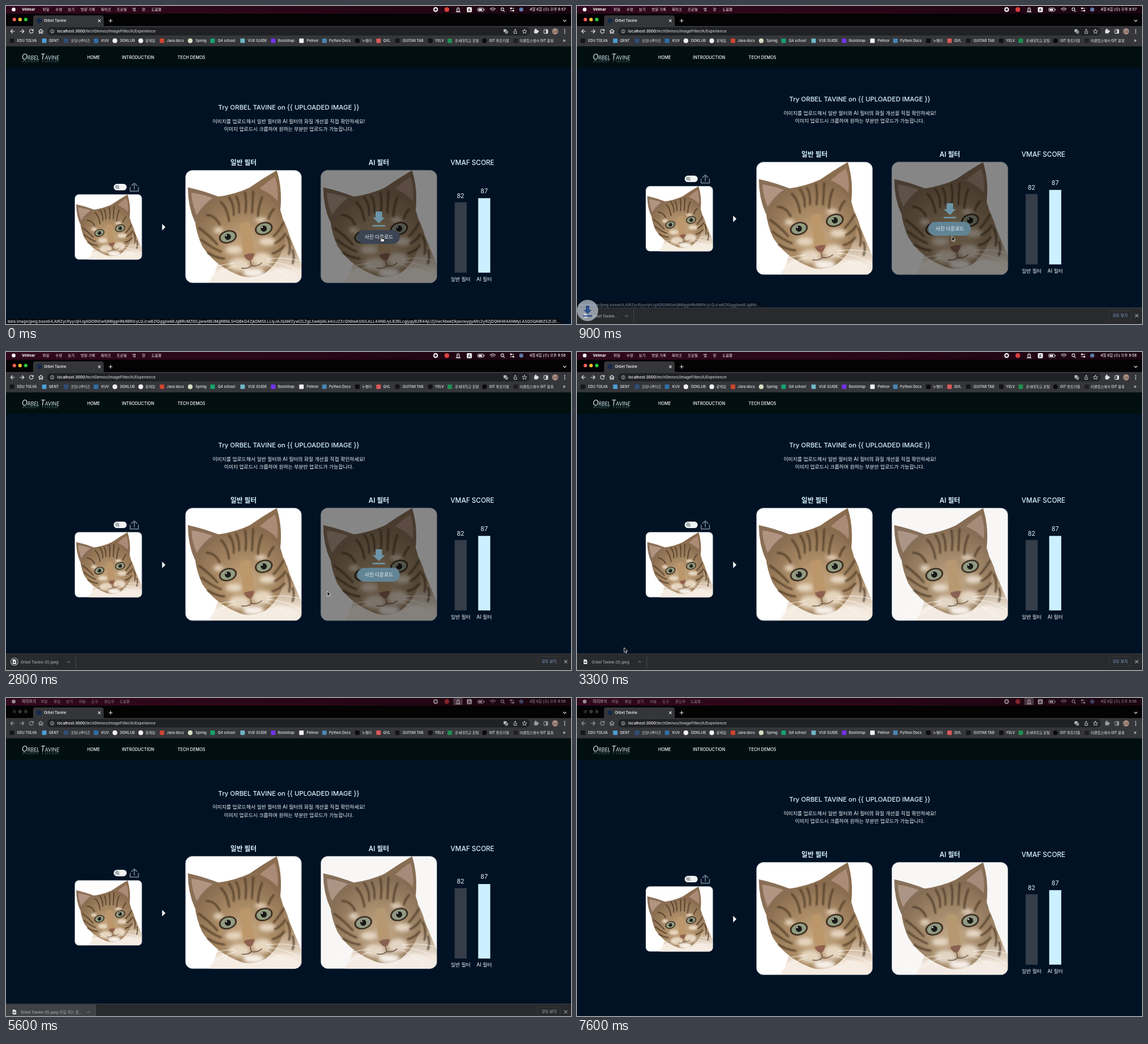
An HTML page that plays this animation: 960 by 540 pixels, repeating every 8 s.

```html
<!DOCTYPE html>
<html lang="ko">
<head>
<meta charset="utf-8">
<title>Orbel Tavine</title>
<style>
  html, body { margin: 0; width: 100%; height: 100%; overflow: hidden; background: #011224; }
  svg { display: block; width: 960px; height: 540px; }
  text { font-family: Inter, 'Noto Sans CJK KR', 'Noto Sans CJK', sans-serif; font-weight: 500; white-space: pre; }
  .mid { text-anchor: middle; }
  .end { text-anchor: end; }
  .bold { font-weight: 700; }
  .semi { font-weight: 600; }
  .thin { font-weight: 400; }
  .logo { font: italic 400 12.9px Lato, sans-serif; font-variant: small-caps; }
  .line { fill: none; stroke: #dfe1e5; stroke-width: 1.1; stroke-linecap: round; stroke-linejoin: round; }
</style>
</head>
<body>
<svg id="stage" viewBox="0 0 960 540"></svg>
<script>
const LOOP = 8000;
const NAME = 'Orbel Tavine';
const FILE = NAME + ' (5).jpeg';
const PHOTO_W = 197, PHOTO_H = 191;

// y is the middle of the line
const text = (x, y, s, size, fill = '#fff', cls = '', id = '') =>
  `<text id="${id}" class="${cls}" x="${x}" y="${y + size * 0.36}" font-size="${size}" fill="${fill}">${s}</text>`;
const rect = (x, y, w, h, fill, r = 0, more = '') =>
  `<rect x="${x}" y="${y}" width="${w}" height="${h}" rx="${r}" fill="${fill}" ${more}/>`;
const dot = (x, y, r, fill, more = '') => `<circle cx="${x}" cy="${y}" r="${r}" fill="${fill}" ${more}/>`;
const path = (d, fill, more = '') => `<path d="${d}" fill="${fill}" ${more}/>`;
const line = (d, more = '') => `<path class="line" d="${d}" ${more}/>`;

const defs = `<defs>
  <radialGradient id="fur" cx=".56" cy=".66" r=".62">
    <stop offset="0" stop-color="#c9ab84"/><stop offset=".5" stop-color="#a98a65"/><stop offset="1" stop-color="#8a6d50"/>
  </radialGradient>
  <linearGradient id="body" x1="0" y1="0" x2="0" y2="1">
    <stop offset="0" stop-color="#8a6d4c"/><stop offset=".5" stop-color="#b0926e"/><stop offset=".85" stop-color="#f3e8db"/>
  </linearGradient>
  <linearGradient id="fade" gradientUnits="userSpaceOnUse" x1="0" y1="91" x2="0" y2="85">
    <stop offset="0" stop-color="#a9d6ea" stop-opacity=".7"/><stop offset="1" stop-color="#a9d6ea" stop-opacity="0"/>
  </linearGradient>
  <linearGradient id="menuBg"><stop offset="0" stop-color="#31081d"/><stop offset=".5" stop-color="#2a0718"/><stop offset="1" stop-color="#1a0410"/></linearGradient>
  <filter id="soft"><feGaussianBlur stdDeviation=".9"/></filter>
  <filter id="softer"><feGaussianBlur stdDeviation="3"/></filter>
  <clipPath id="frame"><rect width="${PHOTO_W}" height="${PHOTO_H}" rx="12"/></clipPath>
  <clipPath id="view"><rect y="69" width="960" height="471"/></clipPath>
  <g id="cat">${cat()}</g>
</defs>`;

function cat() {
  const eye = (x, y) => `<g transform="translate(${x} ${y}) rotate(-16)">
    <ellipse rx="15.5" ry="11" fill="#3f3024"/><ellipse rx="12.5" ry="8.6" fill="#929c80"/>
    ${dot(0, 0, 5.2, '#1b1a18')}${dot(-2, -3, 1.2, '#e9eee8')}</g>`;
  const stripes = 'M60 54Q71 64 74 86M74 46Q83 58 82 76M86 44Q92 54 91 72M101 38Q104 50 102 72' +
    'M115 36Q114 54 113 72M130 46Q124 60 123 78M36 76Q50 76 58 92M150 66Q144 72 141 82' +
    'M23 98Q40 110 54 126M27 118Q45 132 60 138M38 140Q52 149 66 150' +
    'M166 90Q158 104 150 112M170 108Q162 119 152 124M168 128Q160 138 148 141M173 112Q180 126 176 142M182 136Q186 146 182 158';
  return path('M152 60Q171 88 177 112Q188 138 198 162V192H46Q48 176 56 156Z', 'url(#body)') +
    path('M40 192Q48 172 66 164Q105 190 160 166Q190 168 198 192Z', '#f5ece2', 'filter="url(#soft)"') +
    path('M16 84Q30 58 54 45Q84 41 110 29Q140 42 160 64Q170 92 169 120Q162 154 136 174Q110 188 86 176Q48 160 28 128Q18 106 16 84Z', 'url(#fur)') +
    path('M57 45Q28 34 4 29Q4 62 16 88Q30 62 57 45Z', '#8a6f57') +
    path('M46 47Q26 40 10 38Q11 58 19 76Q30 58 46 47Z', '#b19482') +
    path('M108 30Q131 14 155 0Q165 32 161 68Q145 45 108 30Z', '#8a6c4f') +
    path('M126 31Q141 18 152 11Q159 32 156 52Q145 39 126 31Z', '#ab8a76') +
    `<g filter="url(#softer)" fill="#e6d6c0">
      <ellipse cx="82" cy="135" rx="14" ry="7"/><ellipse cx="139" cy="121" rx="14" ry="7"/>
      <ellipse cx="56" cy="102" rx="8" ry="5"/><ellipse cx="128" cy="84" rx="10" ry="4"/>
      <ellipse cx="91" cy="160" rx="18" ry="11"/><ellipse cx="131" cy="152" rx="17" ry="12"/>
      <ellipse cx="116" cy="174" rx="18" ry="8" fill="#f7f0e8"/>
    </g>
    <g filter="url(#soft)">
      <path d="${stripes}" fill="none" stroke="#4a3625" stroke-width="3.4" stroke-linecap="round" opacity=".75"/>
      ${path('M92 92Q101 86 110 89Q113 118 119 144L99 148Q95 120 92 92Z', '#bb976b')}
    </g>` + eye(72, 113) + eye(133, 99) +
    path('M99 144Q108 140 117 141Q116 150 110 154Q102 152 99 144Z', '#8f604f') +
    path('M110 154L112 162M95 166Q106 168 112 162Q122 164 130 157', 'none', 'stroke="#5a4135" stroke-width="1.5" opacity=".8"') +
    path('M84 158Q50 160 22 174M86 162Q58 170 34 188M138 151Q168 146 194 154M138 155Q168 156 195 172M136 159Q160 168 178 186', 'none', 'stroke="#fff" stroke-width=".9" opacity=".85"');
}

const photo = (x, y, s, bg, more = '') => `<g transform="translate(${x} ${y}) scale(${s})">
  <g clip-path="url(#frame)">${rect(0, 0, PHOTO_W, PHOTO_H, bg)}<use href="#cat" ${more}/></g>
  ${rect(0, 0, PHOTO_W, PHOTO_H, 'none', 12, `stroke="#a9b7c2" stroke-width="${1 / s}" stroke-dasharray="${1.2 / s}"`)}</g>`;

function page() {
  const pale = '#d8f3ff';
  return `<g clip-path="url(#view)"><g id="page">` +
    text(480.5, 172, `Try ${NAME.toUpperCase()} on {{ UPLOADED IMAGE }}`, 11, pale, 'mid') +
    text(480.5, 195.5, '이미지를 업로드해서 일반 필터와 AI 필터의 화질 개선을 직접 확인하세요!', 8.5, '#f0f7fb', 'mid thin') +
    text(480.5, 209, '이미지 업로드시 크롭하여 원하는 부분만 업로드가 가능합니다.', 8.5, '#f0f7fb', 'mid thin') +
    text(403.5, 266, '일반 필터', 11.3, pale, 'mid semi') +
    text(633.5, 266, 'AI 필터', 11.3, pale, 'mid semi') +
    text(792.5, 266, 'VMAF SCORE', 11.3, pale, 'mid') +
    photo(117, 320, 0.578, '#fff') + photo(305, 279, 1, '#fff') +
    photo(535, 279, 1, '#f8f7f6', 'style="filter:saturate(.85)"') +
    `<g id="hover">${rect(535, 279, PHOTO_W, PHOTO_H, '#000', 12, 'opacity=".46"')}
      ${path('M628 349H639V359H644L633.5 369L623 359H628ZM623 372H644V374.5H623Z', '#6c95a8')}
      <rect id="pill" x="597" y="380.5" width="72" height="23.5" rx="11.7"/>
      ${text(633.5, 392, '사진 다운로드', 8.4, '#f2f6f8', 'mid thin')}</g>` +
    rect(183, 302, 22, 11, '#f0f2f2', 5.5) + dot(189, 307.5, 4.6, '#d4dade') +
    line('M186.8 307a2 2 0 1 0 4 0a2 2 0 1 0-4 0M190.4 308.6l1.8 1.8', 'style="stroke:#56636d;stroke-width:.9"') +
    line('M211 308V314.5H225V308M218 311V301M213.5 305L218 300.8L222.5 305', 'style="stroke:#65727f;stroke-width:1.8"') +
    path('M265.3 370L270.9 375.5L265.3 381Z', '#fff') +
    rect(762.3, 333.3, 20.5, 119.5, '#353d49') + rect(802.3, 326.3, 20.5, 126.5, '#ccf0ff') +
    text(772.3, 322, '82', 10.4, '#e6f4fa', 'mid thin') + text(812.5, 314, '87', 10.4, '#e6f4fa', 'mid thin') +
    text(772.5, 463.5, '일반 필터', 8.5, '#f0f7fb', 'mid thin') + text(812.5, 463.5, 'AI 필터', 8.5, '#f0f7fb', 'mid thin') +
    '</g></g>';
}

function header() {
  const logo = (fill, more) => `<text class="logo" x="27" y="90.5" fill="${fill}" ${more}>${NAME}</text>`;
  return rect(0, 68, 960, 37, '#010f10') +
    logo('#d6e8f0', '') + logo('url(#fade)', 'transform="translate(0 182) scale(1 -1)"') +
    text(138, 87, 'HOME', 7.1) + text(197, 87, 'INTRODUCTION', 7.1) + text(291.5, 87, 'TECH DEMOS', 7.1);
}

const menu = (id, app, items) => `<g id="${id}">${text(27, 6, app, 6.5, '#fff', 'bold')}` +
  items.map(([x, s]) => text(x, 6, s, 6.2)).join('') + '</g>';

function menuBar() {
  return rect(0, 0, 960, 13, 'url(#menuBg)') + rect(760, 0, 16, 12, '#5b4852', 2, 'id="busy" opacity=".7"') +
    '<g id="menu">' + dot(13, 6, 3.2, '#fff') +
    menu('browserMenu', 'Velmar', [[62, '파일'], [84, '수정'], [105, '보기'], [127, '방문 기록'], [161, '북마크'], [188, '프로필'], [215, '탭'], [231, '창'], [247, '도움말']]) +
    menu('viewerMenu', '미리보기', [[59, '파일'], [81, '편집'], [102, '보기'], [124, '이동'], [145, '도구'], [167, '윈도우'], [193, '도움말']]) +
    dot(730, 6, 3, 'none', 'stroke="#fff" stroke-width="1.8"') + dot(749, 6, 4, '#d9413c') +
    line('M766 9V5Q768 0 770.5 5V9ZM764.5 10H772M768.2 4.5V6') +
    rect(783, 2, 8.5, 8.5, '#fff', 1.5) + text(787.2, 6.3, 'A', 6.5, '#333', 'mid bold') +
    rect(801.5, 3.5, 10, 5.5, 'none', 1.5, 'stroke="#fff" stroke-width=".8"') + rect(803, 4.8, 6, 3, '#fff') + rect(812.3, 5.2, 1, 2, '#fff') +
    line('M822.5 5Q827 1.5 831.5 5M824.3 7Q827 5 829.7 7M827 9V9') +
    line('M841 5.5a2.4 2.4 0 1 0 4.8 0a2.4 2.4 0 1 0-4.8 0M845 7.6L847 9.6') +
    line('M857 4H863M857 8H863') + dot(858, 4, 1.4, '#fff') + dot(862, 8, 1.4, '#fff') +
    dot(875.5, 6, 3.6, '#5b78a8') + text(951, 6, '', 6.25, '#fff', 'end', 'clock') + '</g>';
}

// icon x, colour, label x, label
const marks = [
  [10, '#141518', 19, 'EDU TOLVA'], [65, '#4d9fd6', 73, 'QENT'], [102, '#2f4d78', 110, '코딩나루터즈'],
  [153, '#2f6fa8', 162, 'KUV'], [185, '#f1f1f1', 194, 'DOKLUB'], [229, '#f1f1f1', 237, '문제집'],
  [265, '#d1452f', 273, 'Java docs'], [313, '#d5dcc0', 322, 'Spring'], [351, '#15a36c', 360, 'Q4 school'],
  [402, '#6fb6c8', 411, 'VUE GUIDE'], [454, '#7332f0', 462, 'Bootstrap'], [502, '#f4f4f4', 511, 'Pelmor'],
  [541, '#4a86b5', 549, 'Python Docs'], [597, '#0c0c0c', 605, '누벨라'], [633, '#d85a58', 641, 'QVL'],
  [665, '#151515', 674, 'GUITAR TAB'], [721, '#111', 729, 'YELV'], [754, '#1f8f4f', 763, '온새대학교 포털'],
  [813, '#0a0a0a', 821, 'GIT 튜토리얼'], [866, '#202022', 873, '이클립스에서 GIT 활용']];
const roundMarks = [185, 229, 313, 813];

function browser() {
  const icons = line('M14.5 43H8M11 40L8 43L11 46M24 43H30.5M27.5 40L30.5 43L27.5 46') +
    line('M45.8 41.2A3.2 3.2 0 1 0 46.2 43.6M46.4 39.6V41.6H44.4') +
    line('M55.5 43L59.3 39.5L63 43M56.7 42.5V46.5H58.2V44H60.4V46.5H61.9V42.5');
  return rect(0, 13, 960, 22, '#030304') +
    '<g id="lights">' + ['#ff5f57', '#febc2e', '#28c840'].map((c, i) => dot(14.2 + i * 9.7, 23, 3, c)).join('') + '</g>' +
    path('M43 35Q46 35 46 32V20Q46 16 50 16H162Q166 16 166 20V32Q166 35 169 35Z', '#35363a') +
    dot(56.5, 25, 4, '#13294a') + text(64.5, 25, NAME, 6.3) +
    line('M156.8 23.2L160.4 26.8M160.4 23.2L156.8 26.8M175 25H180.5M177.7 22.2V27.8') + line('M947 24L949.3 26.3L951.6 24') +
    rect(0, 34, 960, 34.5, '#35363a') + rect(70, 36, 820, 14, '#202124', 7) +
    `<g id="tools">${icons}` +
    rect(897.5, 40.5, 6, 6, '#dfe1e5', 1) + dot(900, 40, 1.4, '#dfe1e5') + dot(904, 43, 1.4, '#dfe1e5') +
    rect(914, 40, 6.5, 6.5, 'none', 1, 'stroke="#dfe1e5"') + rect(917.5, 40, 3, 6.5, '#dfe1e5') + '</g>' +
    dot(78.5, 43, 3, 'none', 'stroke="#bdc1c6" stroke-width=".9"') + line('M78.5 42.8V44.6M78.5 41.3V41.4', 'style="stroke-width:.8"') +
    text(87, 43, 'localhost:3000<tspan fill="#c8ccd1">/techDemos/ImageFilter/A/Experience</tspan>', 6.55) +
    rect(845.5, 39.5, 5, 5, '#bdc1c6', .8) + rect(848, 42, 5, 5, '#85898f', .8) +
    line('M863 42.5V46.5H867.5V42.5M865.2 44V39.5M863.8 40.8L865.2 39.4L866.6 40.8', 'style="stroke-width:.8"') +
    line('M881 39.4L882.1 41.9L884.8 42.1L882.8 43.9L883.4 46.5L881 45.1L878.6 46.5L879.2 43.9L877.2 42.1L879.9 41.9Z', 'style="stroke-width:.8"') +
    dot(933, 43, 5.2, '#a98e80') + text(933, 43, '누리', 4.6, '#332a28', 'mid') +
    [40, 43, 46].map(y => dot(949.3, y, .9, '#dfe1e5')).join('') +
    marks.map(([ix, c, x, s]) =>
      (roundMarks.includes(ix) ? dot(ix, 59, 4, c) : rect(ix - 3.8, 55.2, 7.6, 7.6, c, 1)) + text(x, 59, s, 6, '#e8eaed')).join('') +
    text(946, 58.5, '»', 8, '#e8eaed');
}

function shelf() {
  return `<g id="shelf">${rect(0, 512.5, 960, 28, '#292a2d')}${rect(0, 512, 960, .8, '#45474b')}
    <rect id="chip" y="513" height="27" fill="#414246"/>
    ${path('M11.3 522H15.2L17.3 524V530H11.3Z', '#e8eaed')}${rect(12.7, 525.5, 3, 2.4, '#55585d')}
    ${dot(14.3, 526, 6.2, 'none', 'id="ring" stroke="#f1f3f4" stroke-width="1.1"')}
    ${text(25, 526.5, '', 6.4, '#a5a9ae', '', 'file')}
    <g id="chipEnd">${line('M-14 527.3L-11.7 525L-9.4 527.3', 'style="stroke:#9aa0a6;stroke-width:.9"')}${rect(0, 516, .8, 21, '#505257')}</g>
    ${rect(903.5, 517.5, 38.5, 16.5, 'none', 2, 'stroke="#3a3c40" stroke-width=".8"')}
    ${text(923, 525.8, '모두 보기', 6.3, '#8ab4f8', 'mid', 'showAll')}
    ${line('M948.7 523.5L953.3 528.1M953.3 523.5L948.7 528.1', 'style="stroke:#9aa0a6"')}</g>`;
}

const overlay = `<g id="status"><rect id="statusBg" y="530" height="10" fill="#0a0e14" rx="2"/>${text(2.5, 535.3, '', 6.6, '#e2e5e9', '', 'statusText')}</g>` +
  shelf() +
  `<g id="badge">${dot(0, 0, 18, '#bcc5d3')}${path('M-3 -8H3V-1H7L0 6L-7 -1H-3ZM-8 8H8V10.5H-8Z', '#2f5fae')}</g>
  <g id="cursor" stroke="#fff" stroke-width=".8" fill="#000">
    <path id="arrow" d="M0 0V8.2L1.9 6.5L3.2 9.4L4.6 8.8L3.3 6H5.8Z"/>
    <path id="hand" fill="#fff" stroke="#111" d="M.2 1.2Q1 0 1.8 1.2V4L5 4.7Q6 5 5.8 6.3L5 9.6H1.2L-1.5 6.4Q-1.4 5.2 .2 6Z"/></g>`;

const stage = document.getElementById('stage');
stage.innerHTML = defs + rect(0, 0, 960, 540, '#011224') + page() + header() + menuBar() + browser() + overlay;
const el = {};
stage.querySelectorAll('[id]').forEach(n => { if (n.id) el[n.id] = n; });

const set = (id, attr, v) => el[id].setAttribute(attr, v);
const show = (id, on) => set(id, 'display', on ? 'inline' : 'none');
const label = (id, s) => { if (el[id].textContent !== s) el[id].textContent = s; };
const ease = p => p * p * (3 - 2 * p);
const ramp = (t, a, b) => ease(Math.min(1, Math.max(0, (t - a) / (b - a))));

// Long link made by a seeded rule, cut to a width
let seed = 7;
const rand = () => (seed = (seed * 16807) % 2147483647) / 2147483647;
const letters = 'AQSkZJRgBDwcMjIyNHLl4';
const link = ['data', 'image/jpeg;base' + 64 + ','].join(':') +
  Array.from({ length: 260 }, () => letters[Math.floor(rand() * letters.length)]).join('');
function cut(width) {
  let n = link.length;
  do { el.statusText.textContent = link.slice(0, n--) + '...'; } while (el.statusText.getComputedTextLength() > width && n > 30);
  return el.statusText.textContent;
}
const longLink = cut(939), shortLink = cut(311);

// time, x, y of the pointer
const track = [[0, 637, 391], [1900, 637, 391], [2400, 600, 395], [2700, 600, 395], [3200, 80, 502], [3300, 80, 502], [3500, 68, 522], [LOOP, 68, 522]];
function pointer(t) {
  const i = track.findIndex(k => k[0] > t);
  const [a, ax, ay] = track[i - 1], [b, bx, by] = track[i];
  const p = ramp(t, a, b);
  return [ax + (bx - ax) * p, ay + (by - ay) * p];
}

function render(t) {
  const open = ramp(t, 400, 700) * (1 - ramp(t, 5500, 5800));
  const lift = 14 * open;
  const [x, y] = pointer(t);
  const away = t >= 4200;

  set('page', 'transform', `translate(0 ${-lift})`);
  set('shelf', 'transform', `translate(0 ${28 * (1 - open)})`);

  const onPhoto = x > 535 && x < 733 && y > 279 - lift && y < 471 - lift;
  const onPill = onPhoto && x > 597 && x < 669 && y > 380 - lift && y < 404 - lift - 1;
  show('hover', onPhoto);
  set('pill', 'fill', onPill ? '#3b4452' : '#628596');
  show('hand', onPill);
  show('arrow', !onPill);
  show('cursor', t < 5500);
  set('cursor', 'transform', `translate(${x} ${y})`);

  const short = t >= 600;
  label('statusText', short ? shortLink : longLink);
  set('statusBg', 'width', short ? 318 : 944);
  set('status', 'transform', `translate(0 ${-28 * open})`);
  set('status', 'opacity', 1 - ramp(t, 600, 1200));

  const [file, chipWidth] = t < 1400 ? [NAME + '...', 96] : t < 3800 ? [FILE, 118] : [FILE + ' 파일 여는 중...', 152];
  label('file', file);
  set('chip', 'width', chipWidth);
  show('chip', y > 513);
  set('chipEnd', 'transform', `translate(${chipWidth} 0)`);
  show('ring', t >= 1400 && t < 2900);
  set('ring', 'opacity', 0.4 + 0.6 * Math.abs(Math.cos((t - 2600) / 600 * Math.PI)));
  set('showAll', 'fill', away ? '#c3c6ca' : '#8ab4f8');

  const drop = (t - 600) / 600;
  show('badge', drop > 0 && drop < 1);
  set('badge', 'transform', `translate(18 ${497 + (drop - 1 / 6) * 60})`);
  set('badge', 'opacity', Math.max(0, 0.72 * Math.sin(Math.PI * drop)));

  show('browserMenu', !away);
  show('viewerMenu', away);
  show('busy', away);
  set('menu', 'opacity', away ? 0.52 : 1);
  set('tools', 'opacity', away ? 0.6 : 1);
  el.lights.style.filter = away ? 'grayscale(1) brightness(.3)' : 'none';
  label('clock', '4월 6일 (수) 오후 9:' + (t < 1300 ? '57' : '58'));
}

const start = performance.now();
function tick() {
  const t = (performance.now() - start) % LOOP;
  render(Math.floor(t / 100) * 100); // ten pictures a second
  requestAnimationFrame(tick);
}
tick();
</script>
</body>
</html>
```
